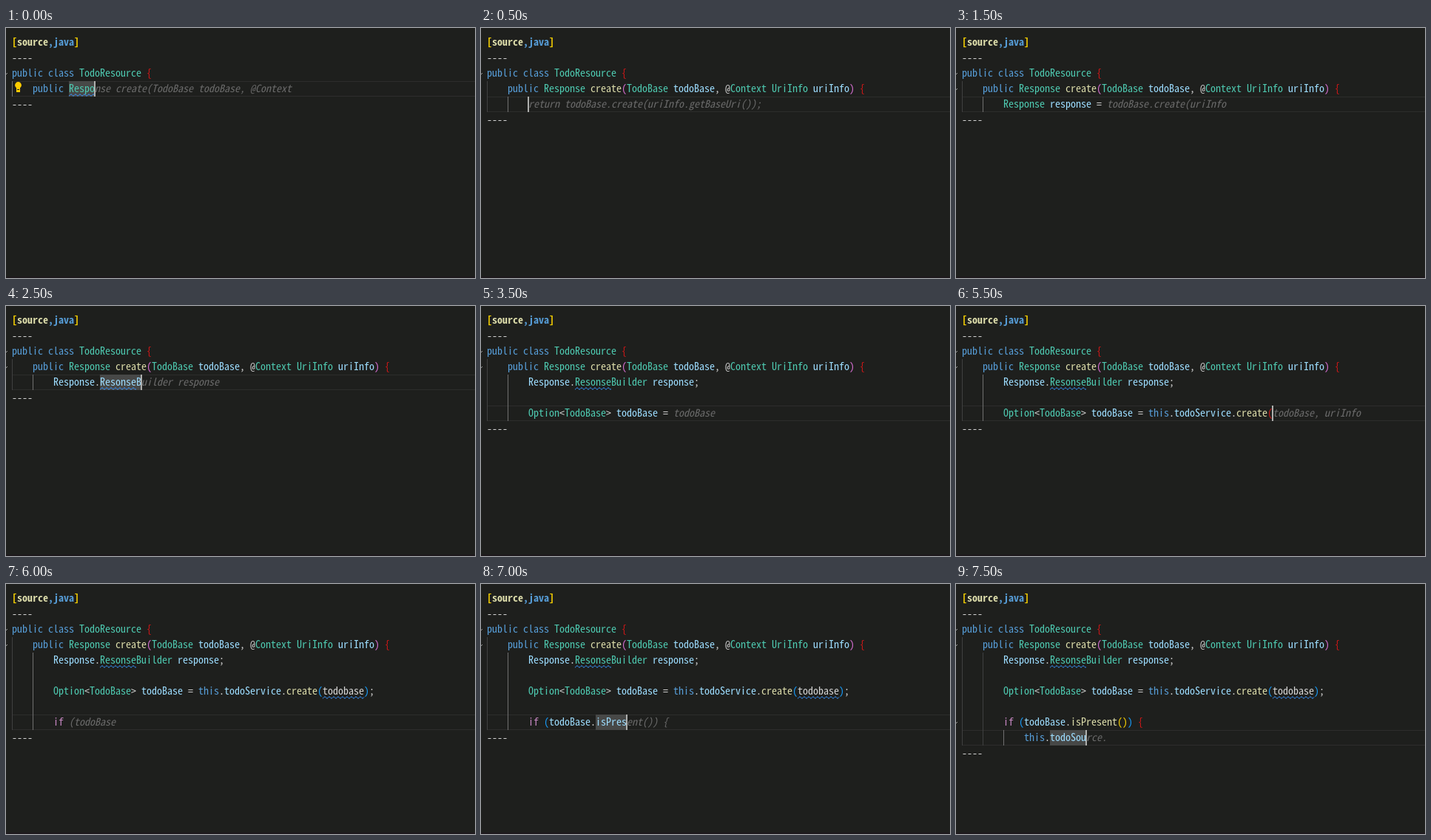
Recreate the animation shown at these times as an HTML page with a canvas. Size 634x339 px, loop 8000 ms.

```html
<!DOCTYPE html>
<html lang="en">
<head>
<meta charset="utf-8">
<title>Typing Java code</title>
<style>
html, body { margin: 0; width: 100%; height: 100%; overflow: hidden; background: #1e1f1d; }
canvas { display: block; }
</style>
</head>
<body>
<canvas id="stage" width="634" height="339"></canvas>
<script>
const ctx = document.getElementById("stage").getContext("2d");
const W = 634, H = 339, LEFT = 8, TOP = 9, CELL = 7, ROW = 21, STEP = 500;
const FONT = '"Noto Sans Mono CJK JP", "Noto Sans Mono", monospace';

// Pick the size at which one character fills one cell.
ctx.font = "100px " + FONT;
const size = CELL * 100 / ctx.measureText("0").width;

// Each "|" part starts with its colour key; an upper-case key adds a squiggle.
const COLORS = {
  k: "#569cd6", t: "#4ec9b0", f: "#dcdcaa", v: "#9cdcfe", w: "#d4d4d4", c: "#c586c0",
  r: "#d01818", m: "#da70d6", y: "#ffd700", b: "#179fff", g: "#6b6b6b"
};
const HEAD = ["y[|fsource|k,java|y]", "w----", "kpublic class |tTodoResource |r{"];
const SIG = "w    |kpublic |tResponse |fcreate|m(|tTodoBase |vtodoBase|w, @|tContext UriInfo |vuriInfo|m) |r{";
const PAD = "w        ";
const BUILDER = PAD + "|vResponse|w.|TResonse|tBuilder |vresponse|w;";
const OPTION = PAD + "|tOption|w<|tTodoBase|w> |vtodoBase |w= ";
const THIS = OPTION + "|kthis|w.";
const SERVICE = THIS + "|vtodoService|w.";
const CREATE = SERVICE + "|fcreate|b(|Wtodobase|b)|w;";
const IF = PAD + "|cif ";
const COND = IF + "|b(|vtodoBase|w.";
const decl = last => [SIG, BUILDER, "w", last];
const body = (...last) => [SIG, BUILDER, "w", CREATE, "w", ...last];

// [lines, suggestion, caret visible, length of the highlighted word]
const STEPS = [
  [["w    |kpublic |TRespo"], "nse create(TodoBase todoBase, @Context", 1, 5],
  [[SIG, PAD], "return todoBase.create(uriInfo.getBaseUri());", 1, 0],
  [[SIG, PAD + "|TRespon"], "se response", 1, 6],
  [[SIG, PAD + "|tResponse |vresponse |w= "], "todoBase.create(uriInfo", 0, 0],
  [[SIG, PAD + "|vResponse|w.|vR"], "", 1, 1],
  [[SIG, PAD + "|vResponse|w.|VResonse|vB"], "uilder response", 1, 8],
  [decl(PAD + "|tOpt"), "ional<TodoBase> todoBase", 1, 3],
  [decl(OPTION), "todoBase", 0, 0],
  [decl(THIS), "todoBase", 1, 0],
  [decl(THIS + "|vtodoSe"), "rvice", 0, 6],
  [decl(SERVICE), "create", 1, 0],
  [decl(SERVICE + "|fcreate|r("), "todoBase, uriInfo", 1, 0],
  [body(IF), "(todoBase", 0, 0],
  [body(COND), "getId() != null", 0, 0],
  [body(COND + "|visPres"), "ent()) {", 1, 6],
  [body(COND + "|fisPresent|y()|b) |r{", PAD + "w    ".slice(1) + "|kthis|w.|vtodoSou"), "rce.", 1, 7]
];

const colX = col => LEFT + col * CELL;
const rowY = row => TOP + row * ROW;
const depth = row => row < 4 ? 1 : row < 9 ? 2 : 3;
const parse = line => line.split("|").map(part => [part[0], part.slice(1)]);
const width = line => parse(line).reduce((sum, [, text]) => sum + text.length, 0);

function rect(x, y, w, h, color) {
  ctx.fillStyle = color;
  ctx.fillRect(x, y, w, h);
}

function write(text, col, row, color, style = "") {
  ctx.font = `${style} ${size}px ${FONT}`;
  ctx.fillStyle = color;
  [...text].forEach((ch, i) => ctx.fillText(ch, colX(col + i), rowY(row) + 15));
}

function squiggle(col, row, length) {
  const x = colX(col), end = length * CELL, y = rowY(row) + 19;
  ctx.beginPath();
  for (let i = 0; i <= end; i++) ctx.lineTo(x + i, y + 1.2 * Math.cos(i * Math.PI / 3));
  ctx.strokeStyle = "#3794ff";
  ctx.lineWidth = 1;
  ctx.stroke();
}

function drawLine(line, row) {
  let col = 0;
  for (const [key, text] of parse(line)) {
    const base = key.toLowerCase();
    write(text, col, row, COLORS[base], row ? "" : "bold");
    if (key !== base) squiggle(col, row, text.length);
    col += text.length;
  }
}

function fold(row) {
  const y = rowY(row) + 10;
  ctx.beginPath();
  ctx.moveTo(-1, y + 3);
  ctx.lineTo(2, y);
  ctx.strokeStyle = "#9a9a9a";
  ctx.lineWidth = 1;
  ctx.stroke();
}

function bulb() {
  ctx.fillStyle = "#ffcc00";
  ctx.beginPath();
  ctx.arc(16.5, 77.5, 4.4, 0, 7);
  ctx.fill();
  ctx.fillRect(14, 80, 5, 7);
  rect(15, 83, 3, 1, "#1e1f1d");
}

function draw(n) {
  const [lines, hint, caret, word] = STEPS[n];
  const rows = [...HEAD, ...lines], last = rows.length - 1;
  const col = width(rows[last]), y = rowY(last);

  rect(0, 0, W, H, "#1e1f1d");
  rect(0, H - 2, W, 2, "#1d191c");
  rect(LEFT, y, W, 1, "#2d2d2c");
  rect(LEFT, y + ROW - 1, W, 1, "#2d2d2c");
  rect(colX(col - word), y, word * CELL, ROW, "#474847");
  for (let row = 3; row <= last; row++) {
    for (let d = 0; d < depth(row); d++) {
      rect(colX(d * 4), rowY(row), 1, ROW, d === depth(last) - 1 ? "#707070" : "#404040");
    }
  }

  rows.forEach(drawLine);
  drawLine(HEAD[1], last + 1);
  write(hint, col, last, COLORS.g, "italic");
  if (caret) rect(colX(col) - 1, y, 2, ROW, "#aeafad");

  fold(2);
  if (n > 1) fold(3);
  if (n === 15) fold(8);
  if (n === 0) bulb();
}

const start = performance.now();
function tick() {
  draw(Math.floor((performance.now() - start) / STEP) % STEPS.length);
  requestAnimationFrame(tick);
}
tick();
</script>
</body>
</html>
```
